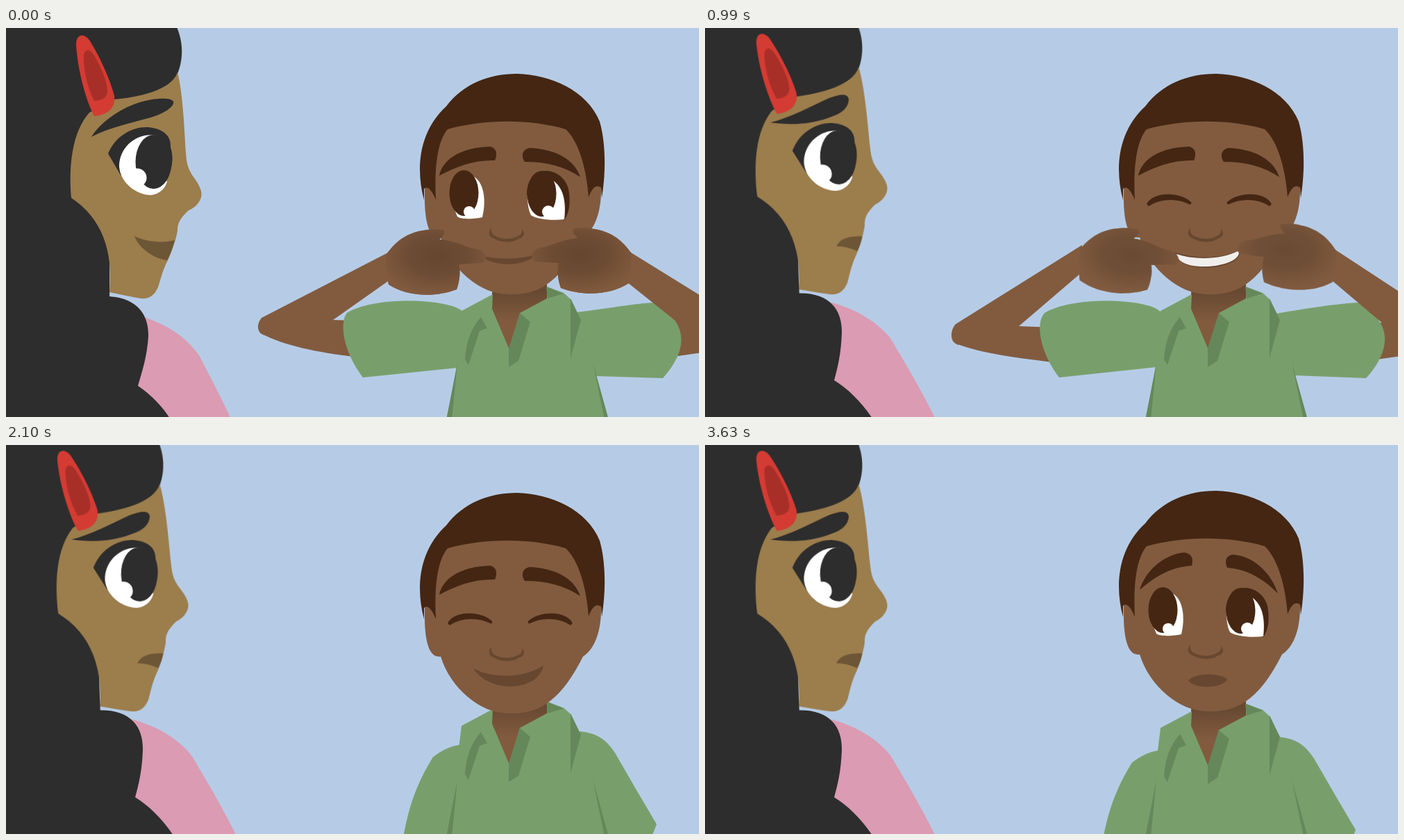
An HTML page for the animation above (4160 ms loop, 998 by 561 pixels).

```html
<!DOCTYPE html>
<html lang="en">
<head>
<meta charset="utf-8">
<title>Two friends</title>
<style>
html, body { margin: 0; width: 100%; height: 100%; overflow: hidden; background: #b6cce6; }
svg { display: block; width: 100vw; height: 100vh; }
.anim { animation: 4160ms ease-in-out infinite; }

.skin { fill: #825b3f; }
.brown { fill: #442613; }
.shade { fill: #67472f; }
.white { fill: #fff; }
.green { fill: #789f6b; }
.fold { fill: #65885a; }
.black { fill: #2d2d2d; }

/* Girl */
.g-head { animation-name: g-head; transform-origin: 35px 735px; }
@keyframes g-head {
  0%, .72% { transform: rotate(0deg); }
  16.83%, 100% { transform: rotate(-2.18deg); }
}
.g-brow { animation-name: g-brow; }
@keyframes g-brow {
  0%, .72% { d: path("M123,157 C135,138 160,118 190,108 C215,100 238,100 241,106 C243,114 225,125 205,130 C180,137 150,143 123,157Z"); }
  16.83%, 100% { d: path("M117,139 C145,133 172,120 200,108 C222,100 230,102 231,110 C230,122 220,130 205,134 C180,143 150,145 117,139Z"); }
}
.g-mouth { animation-name: g-mouth; }
@keyframes g-mouth {
  0%, .72% { d: path("M185,300 C200,308 225,311 243,306 C240,318 236,328 232,335 C210,332 190,315 185,300Z"); }
  12.26% { d: path("M208,317 C216,308 228,305 243,305 C240,318 236,328 233,337 C222,333 210,328 208,317Z"); animation-timing-function: ease-out; }
  16.83%, 100% { d: path("M205,321 C211,309 226,307 243,308 C241,316 239,322 235,329 C226,325 216,321 205,321Z"); }
}
.g-hair { animation-name: g-hair; }
@keyframes g-hair {
  0%, .72% { d: path("M140,387 C185,386 206,410 205,445 C203,475 196,495 190,516 C210,530 225,545 238,566 L-60,566 L-60,387Z"); }
  16.83%, 100% { d: path("M125,383 C178,378 198,405 197,440 C196,470 191,490 186,508 C208,522 226,540 243,566 L-60,566 L-60,383Z"); }
}
.g-top { animation-name: g-top; }
@keyframes g-top {
  0%, .72% { d: path("M190,414 C225,425 255,440 278,472 C295,505 310,533 325,566 L180,566Z"); }
  16.83%, 100% { d: path("M170,393 C215,402 250,425 268,449 C290,486 313,525 333,566 L170,566Z"); }
}

/* Boy: face */
.shrug { animation-name: shrug; }
@keyframes shrug {
  0%, 46.9% { transform: translateY(0); }
  50.48%, 51.92% { transform: translateY(var(--dy)); }
  60.1%, 100% { transform: translateY(0); }
}
.eyes { animation-name: eyes; transform-origin: 725px 252px; }
@keyframes eyes {
  0%, 4.3% { transform: scaleY(1); }
  6.5%, 39.7% { transform: scaleY(0); }
  41.8%, 46.15% { transform: scaleY(1); }
  48.3%, 55.5% { transform: scaleY(0); }
  57.7%, 100% { transform: scaleY(1); }
}
.lids { animation-name: lids; animation-timing-function: step-end; }
@keyframes lids {
  0% { opacity: 0; }
  6% { opacity: 1; }
  40.2% { opacity: 0; }
  47.8% { opacity: 1; }
  56% { opacity: 0; }
  100% { opacity: 0; }
}
.brow-l { animation-name: brow-l; }
@keyframes brow-l {
  0%, 68.5% { d: path("M624,213 C628,190 655,172 697,171 C707,173 708,183 704,191 C675,190 650,199 624,213Z"); }
  78.1%, 100% { d: path("M626,209 C634,182 660,158 690,155 C701,156 704,165 701,174 C672,176 650,188 626,209Z"); }
}
.brow-r { animation-name: brow-r; }
@keyframes brow-r {
  0%, 68.5% { d: path("M827,215 C820,192 795,175 755,173 C744,174 741,184 747,193 C780,193 805,200 827,215Z"); }
  78.1%, 100% { d: path("M825,214 C815,184 790,160 760,158 C750,159 748,168 752,177 C780,179 803,192 825,214Z"); }
}
.lips { animation-name: lips; }
@keyframes lips {
  0%, .72% { d: path("M680,327 C705,335 745,334 768,325 C745,345 705,346 680,327Z"); }
  12.26%, 28.85% { d: path("M677,323 C705,334 745,333 770,320 C776,350 679,357 677,323Z"); }
  36.06%, 37.5% { d: path("M682,327 C705,333 745,332 770,326 C755,352 700,354 682,327Z"); }
  41.8%, 46.9% { d: path("M670,323 C700,340 750,337 778,316 C760,345 700,350 670,323Z"); }
  50.48%, 51.92% { d: path("M673,319 C700,334 745,334 774,315 C767,352 697,357 673,319Z"); }
  60.1%, 68.5% { d: path("M670,323 C700,340 750,337 778,316 C760,345 700,350 670,323Z"); }
  78.1%, 100% { d: path("M696,340 C705,328 742,328 752,338 C745,352 705,352 696,340Z"); }
}
.teeth { animation-name: teeth; }
@keyframes teeth {
  0%, .72% { d: path("M690,334 C705,338 745,338 760,332 C745,338 705,338 690,334Z"); }
  12.26%, 28.85% { d: path("M679,326 C705,335 745,334 769,321 C774,346 682,355 679,326Z"); }
  36.06%, 37.5% { d: path("M686,330 C705,334 745,333 766,328 C755,348 700,352 686,330Z"); }
  41.8%, 100% { d: path("M690,334 C705,339 745,338 760,330 C745,338 705,339 690,334Z"); }
}

/* Boy: arms */
.sleeve-l { animation-name: sleeve-l; }
@keyframes sleeve-l {
  0%, .72% { d: path("M660,412 C650,390 530,385 491,411 C480,425 485,465 514,504 L650,490 L700,470Z"); }
  12.26%, 28.85% { d: path("M658,412 C648,390 530,385 489,411 C476,425 481,465 510,504 L650,489 L700,470Z"); }
  36.06%, 37.5% { d: path("M664,410 C655,392 540,386 498,412 C486,425 490,465 520,504 L650,490 L700,470Z"); animation-timing-function: ease-in; }
  43.27% { d: path("M656,438 C640,440 630,443 622,447 C600,480 565,520 557,552 L650,590 L700,470Z"); }
  48%, 100% { d: path("M656,440 C640,442 628,448 615,458 C595,490 580,525 572,575 L650,600 L700,470Z"); }
}
.sleeve-r { animation-name: sleeve-r; }
@keyframes sleeve-r {
  0%, .72% { d: path("M822,410 C850,407 900,398 932,396 C985,425 982,465 946,505 L850,502 L800,450Z"); }
  12.26%, 28.85% { d: path("M822,412 C850,407 905,398 940,396 C992,425 988,465 952,505 L850,501 L800,450Z"); }
  36.06%, 37.5% { d: path("M822,410 C850,407 900,399 929,396 C981,425 978,465 942,505 L850,502 L800,450Z"); animation-timing-function: ease-in; }
  43.27% { d: path("M826,418 C850,418 866,430 880,446 C903,474 926,502 949,529 L940,570 L800,580Z"); }
  48%, 100% { d: path("M826,421 C850,423 864,432 877,452 C897,487 917,521 937,555 L927,580 L800,580Z"); }
}
.upper-l { animation-name: upper-l; }
@keyframes upper-l {
  0%, .72% { d: path("M370,417 C360,425 362,438 368,441 C400,458 450,468 500,474 L560,470 L560,424 L471,421Z"); }
  12.26%, 28.85% { d: path("M361,427 C352,438 354,452 361,455 C400,470 450,476 510,483 L560,480 L560,434 L452,430Z"); }
  36.06%, 37.5% { d: path("M369,434 C360,440 361,452 370,458 C400,466 450,476 515,483 L570,480 L570,432 L476,430Z"); animation-timing-function: ease-in; }
  43.27%, 100% { d: path("M550,580 C545,590 545,600 550,610 C570,620 590,620 600,620 L620,600 L620,590 L600,580Z"); }
}
.upper-r { animation-name: upper-r; }
@keyframes upper-r {
  0%, .72% { transform: translateY(0); }
  12.26%, 28.85% { transform: translateY(5px); }
  36.06%, 37.5% { transform: translateY(4px); animation-timing-function: ease-in; }
  43.27%, 100% { transform: translateY(200px); }
}
.fore-l { animation-name: fore-l; }
@keyframes fore-l {
  0%, .72% { d: path("M550,324 L368,418 C360,428 364,440 372,443 L471,421 L556,361Z"); }
  12.26%, 28.85% { d: path("M543,313 L361,427 C352,438 354,452 364,457 L452,430 L543,352Z"); }
  36.06%, 37.5% { d: path("M560,318 L369,434 C360,440 361,452 370,458 L476,430 L562,361Z"); animation-timing-function: ease-in; }
  43.27%, 100% { d: path("M572,530 L545,566 C540,575 545,580 550,585 L592,572 L616,535Z"); }
}
.fore-r { animation-name: fore-r; }
@keyframes fore-r {
  0%, .72% { d: path("M897,322 L1010,392 L1010,459 L890,363Z"); }
  12.26%, 28.85% { d: path("M905,318 L1010,387 L1010,455 L898,360Z"); }
  36.06%, 37.5% { d: path("M888,317 L1010,391 L1010,463 L885,358Z"); animation-timing-function: ease-in; }
  43.27%, 100% { d: path("M848,529 L912,571 L848,620 L848,540Z"); }
}
.hand-l { animation-name: hand-l; transform-origin: 600px 335px; }
@keyframes hand-l {
  0%, .72% { transform: translate(0, 0) rotate(0deg); }
  12.26%, 28.85% { transform: translate(-9px, -3px) rotate(4deg); }
  36.06%, 37.5% { transform: translate(7px, 2px) rotate(0deg); animation-timing-function: ease-in; }
  43.27%, 100% { transform: translate(18px, 157px) rotate(0deg); }
}
.hand-r { animation-name: hand-r; transform-origin: 848px 335px; }
@keyframes hand-r {
  0%, .72% { transform: translate(0, 0) rotate(0deg); }
  12.26%, 28.85% { transform: translate(9px, -5px) rotate(4deg); }
  36.06%, 37.5% { transform: translate(-8px, 1px) rotate(0deg); animation-timing-function: ease-in; }
  43.27%, 100% { transform: translate(-32px, 145px) rotate(0deg); }
}
.palm { animation-name: palm; }
@keyframes palm {
  0%, .72% { opacity: 1; }
  12.26%, 28.85% { opacity: .55; }
  36.06%, 100% { opacity: 1; }
}
.drop { animation-name: drop; animation-timing-function: linear; }
@keyframes drop {
  0%, 43.27% { transform: translateY(0); }
  47.6%, 100% { transform: translateY(190px); }
}
</style>
</head>
<body>
<svg viewBox="0 0 998 561">
  <defs>
    <radialGradient id="dusk" cx=".52" cy=".4" r=".6">
      <stop offset="0" stop-color="#65462f"/>
      <stop offset=".5" stop-color="#6d4c34"/>
      <stop offset="1" stop-color="#815a3e"/>
    </radialGradient>
    <linearGradient id="throat" x2="0" y2="1">
      <stop offset=".1" stop-color="#674931"/>
      <stop offset=".55" stop-color="#825b3f"/>
    </linearGradient>
    <path id="fist" d="M548,326 C557,314 566,305 578,299 C597,290 615,290 630,291 C634,295 630,300 624,305 C640,306 652,311 672,318 C682,318 691,324 691,332 C690,338 685,340 680,339 C670,340 662,340 652,341 C655,351 653,367 649,377 C615,390 575,386 551,370 C548,355 547,340 548,326Z"/>
    <g id="hand">
      <use href="#fist" class="skin"/>
      <use href="#fist" class="anim palm" fill="url(#dusk)"/>
    </g>
    <path id="lid" d="M636,254 C645,235 685,236 700,251 C701,254 699,255 697,254 C680,245 655,246 639,257Z"/>
  </defs>
  <rect width="998" height="561" fill="#b6cce6"/>

  <g id="boy">
    <path class="anim skin upper-l"/>
    <path class="anim skin upper-r" d="M940,420 H1010 V467 L940,477Z"/>
    <g class="anim shrug" style="--dy:-8px">
      <path class="anim green sleeve-l"/>
      <path class="anim green sleeve-r"/>
    </g>

    <g class="anim shrug" style="--dy:-3px">
      <path fill="url(#throat)" d="M701,370 H779 V395 L745,415 L725,470 L698,410Z"/>
      <path class="green" d="M701,384 L656,408 L652,441 L649,488 L634,570 H867 L845,483 L828,422 L813,391 L803,382 L779,373 V390 L740,411 L725,464 L700,405Z"/>
      <path class="fold" d="M778,373 L803,383 L780,390Z M684,417 L693,433 L682,437 L666,486 L661,478 Q663,440 684,417Z M740,411 L755,424 L738,480 L724,489 V462Z M813,390 L828,421 L813,476Z"/>
    </g>
    <path class="fold" d="M650,484 L634,565 H642Z M845,482 L862,565 H868Z"/>

    <g class="anim shrug" style="--dy:3px">
      <path class="skin" d="M603,230 C602,270 606,305 626,302 C640,348 684,384 722,384 C768,387 800,364 831,302 C850,290 858,260 857,228 L845,150 L806,120 H636 L610,160Z"/>
      <path class="brown" d="M602,248 C590,203 594,150 634,113 C658,81 695,66 736,66 C784,67 837,90 855,135 C865,170 863,215 858,245 L857,230 C848,224 843,234 839,244 C836,205 826,165 806,146 C755,131 690,131 636,146 C620,165 617,205 619,248 C613,232 606,227 602,232Z"/>
      <path class="anim brown brow-l"/>
      <path class="anim brown brow-r"/>
      <g class="anim eyes">
        <path class="white" d="M671,213 C689,220 692,250 686,273 C672,276 655,276 650,272 L646,262 L665,262Z"/>
        <path class="brown" d="M750,240 C750,195 800,197 810,232 C814,255 810,268 804,277 L770,265Z"/>
        <path class="white" d="M783,217 C803,227 807,250 804,276 C785,278 765,276 756,270 C752,262 751,250 751,243Z"/>
        <ellipse class="brown" cx="659.5" cy="238" rx="21" ry="33"/>
        <ellipse class="brown" cx="771.5" cy="239" rx="21" ry="33"/>
        <circle class="white" cx="667" cy="265" r="8"/>
        <circle class="white" cx="781" cy="265" r="9"/>
      </g>
      <g class="anim brown lids">
        <use href="#lid"/>
        <use href="#lid" transform="translate(1452 0) scale(-1 1)"/>
      </g>
      <path class="shade" d="M699,288 C692,296 698,303 704,304 C713,310 731,310 738,304 C747,302 748,295 743,290 C744,297 740,299 735,301 C728,305 714,305 707,301 C701,299 698,296 699,288Z"/>
      <path class="anim shade lips"/>
      <path class="anim teeth" fill="#f1efee"/>
    </g>

    <g class="anim drop">
      <path class="anim skin fore-l"/>
      <path class="anim skin fore-r"/>
      <g class="anim hand-l"><use href="#hand"/></g>
      <g class="anim hand-r"><use href="#hand" transform="translate(1448 -2) scale(-1 1)"/></g>
    </g>
  </g>

  <g id="girl">
    <path class="anim g-top" fill="#db9bb2"/>
    <g class="anim g-head">
      <path class="black" d="M-60,-30 H228 C258,5 257,42 247,66 L240,100 L150,130 L149,420 H-60Z"/>
      <path fill="#9c7d4c" d="M247,64 C255,95 257,150 259,180 C260,195 262,202 268,212 C280,228 283,237 281,244 C278,255 268,261 263,263 C250,275 247,282 247,292 C246,300 240,320 233,335 C225,350 222,365 219,374 C213,387 205,391 194,390 C180,388 160,383 149,381 C155,322 138,274 94,245 C90,200 95,150 120,122 L156,103 C190,100 238,90 247,64Z"/>
      <path fill="#d43b33" d="M101,24 C101,8 112,8 119,16 C135,40 150,75 156,98 C158,112 150,125 127,127 C115,105 103,60 101,24Z"/>
      <path fill="#a82f28" d="M112,38 C115,30 120,30 126,38 C138,58 146,78 146,92 C146,100 138,105 127,105 C117,85 111,60 112,38Z"/>
      <path class="anim black g-brow"/>
      <path class="black" d="M147,181 C158,155 182,142 205,143 C230,146 238,158 237,172 C243,190 238,210 228,222 L190,225 L165,212Z"/>
      <path class="white" d="M217,155 C190,150 163,170 163,200 C165,225 190,241 208,241 C222,240 230,230 232,221 L200,200Z"/>
      <ellipse class="black" cx="212.5" cy="193" rx="26" ry="39"/>
      <circle class="white" cx="189" cy="216" r="13.5"/>
      <path class="anim g-mouth" fill="#6c5635"/>
    </g>
    <path class="anim black g-hair"/>
  </g>
</svg>
</body>
</html>
```
